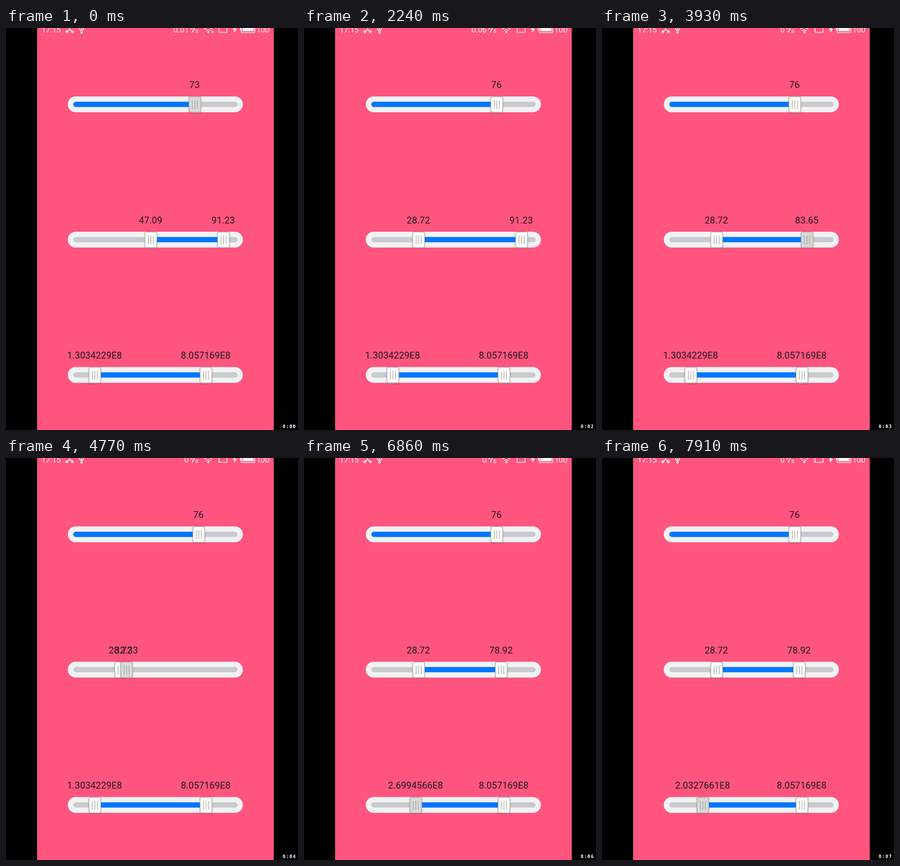
An HTML page with a canvas for the animation above (8000 ms loop, 638 by 878 pixels).

```html
<!DOCTYPE html>
<html>
<head>
<meta charset="utf-8">
<title>Range sliders</title>
<style>
  html, body { margin: 0; width: 100%; height: 100%; overflow: hidden; background: #000; }
  canvas { display: block; }
</style>
</head>
<body>
<canvas id="stage" width="638" height="878"></canvas>
<script>
const g = document.getElementById('stage').getContext('2d');
const LOOP = 8000;
const STEP = 75; // the screen refreshes about this often during a drag
const WHITE = '#fff4f6';

// A thumb rests at its first value and is held down from its first to its last [time, value] point.
const thumb = (rest, ...points) => ({ rest, points });

const sliders = [
  {
    label: v => String(Math.floor(v)),
    thumbs: [thumb(73.8, [0, 73.8], [60, 73.8], [140, 76.2])]
  },
  {
    label: v => v ? String(+v.toFixed(2)) : '0.0',
    thumbs: [
      thumb(47.09, [520, 51.7], [700, 51.7], [970, 27.35], [1370, 0], [1730, 0], [2240, 28.72]),
      thumb(91.23, [3250, 92.8], [3400, 92.8], [3930, 83.65], [4170, 62], [4470, 28.72],
        [4700, 28.72], [4770, 32.33], [5570, 78.92])
    ]
  },
  {
    label: v => (v * 1e7).toExponential(7).replace(/0*e\+/, 'E'),
    thumbs: [
      thumb(13.034229, [6680, 13.034229], [6860, 26.994566], [7080, 44], [7470, 20],
        [7690, 6.1382714], [7910, 20.327661], [LOOP, 20.327661]),
      thumb(80.57169)
    ]
  }
];

// Value and pressed state of a thumb, moving in whole steps between its points.
function pose({ rest, points }, t) {
  const n = points.filter(p => p[0] <= t).length;
  if (n === 0) return { value: rest, down: false };
  const [a, u] = points[n - 1];
  if (n === points.length) return { value: u, down: false };
  const [b, v] = points[n];
  const steps = Math.max(1, Math.round((b - a) / STEP));
  const p = Math.floor((t - a) / (b - a) * steps) / steps;
  return { value: u + (v - u) * p, down: true };
}

function box(x, y, w, h, r, fill) {
  g.fillStyle = fill;
  g.beginPath();
  g.roundRect(x, y, w, h, r);
  g.fill();
}

function text(s, x, y, font, align = 'left', color = WHITE) {
  g.font = font;
  g.textAlign = align;
  g.fillStyle = color;
  g.fillText(s, x, y);
}

function dot(x, y, r) {
  g.beginPath();
  g.arc(x, y, r, 0, 7);
  g.fill();
}

function drawThumb(x, y, down) {
  g.save();
  g.shadowColor = 'rgba(0,0,0,.3)';
  g.shadowBlur = 3;
  g.shadowOffsetY = 0.5;
  box(x - 13.5, y - 17, 27, 35.5, 4, down ? '#b2b2b2' : '#bcbcbc');
  g.restore();
  box(x - 12, y - 15.5, 24, 32, 3, down ? '#d9d9d9' : '#fcfcfc');
  for (const dx of [-5.5, 0, 5.5]) {
    box(x + dx - 0.9, y - 8.5, 1.8, 19, 0, down ? '#b0b0b0' : '#bdbdbd');
  }
}

function drawSlider({ label, thumbs }, y, t) {
  const poses = thumbs.map(th => pose(th, t));
  const xs = poses.map(p => 147 + 3.595 * p.value);
  const range = xs.length > 1;
  const left = range ? xs[0] : 147;
  box(135, y - 17, 382.5, 34.5, 17.2, '#f1f2f4');
  box(147, y - 5.4, 359, 11.4, 5.7, '#c9cacb');
  box(left, y - 5.4, xs[xs.length - 1] - left, 11.4, range ? 0 : [5.7, 0, 0, 5.7], '#0077ff');
  poses.forEach(({ value, down }, i) => {
    drawThumb(xs[i] + 0.3, y, down);
    text(label(value), xs[i] - 0.4, y - 35.5, '20.4px Roboto, sans-serif', 'center', '#241a1d');
  });
}

// Linked nodes, USB, speed slash, card and battery outlines
const outlines = new Path2D(`M139-3V3L133 8M139 3L145 8
  M165-3V10M160.5 0V3L165 6.5 169.5 3V0
  M413-2L407 9.5
  M465.5-2V9.5H483V-2
  M514-2V8Q514 10 516 10H541.5Q543.5 10 543.5 8V-2`);
const bolt = new Path2D('M501-3L495.5 4H499L498 10.5 505 2H501Z');
const download = new Path2D('M450.3 5H451.7V8H453.7L451 11.5 448.3 8H450.3Z');

function drawStatus(t) {
  const font = '17px Roboto, sans-serif';
  const idle = t >= 867;
  text('17:15', 77.5, 9.5, font);
  text(!idle ? '0.01' : t < 3680 ? '0.06' : '0', 399, 9.5, font, 'right');
  text('K', 402.5, 3.5, '10px Roboto, sans-serif');
  text('s', 413.5, 10.5, '14px Roboto, sans-serif');
  text('100', 547, 9.5, font);

  g.strokeStyle = WHITE;
  g.lineWidth = 1.7;
  g.stroke(outlines);
  for (const r of [7, 12]) {
    g.beginPath();
    g.arc(442, 11, r, -Math.PI * 0.76, -Math.PI * 0.24);
    g.stroke();
  }
  g.fill(bolt);
  if (!idle) g.fill(download);
  dot(442, 9, 2.2);
  dot(133, 8.3, 2.8);
  dot(145, 8.3, 2.8);
  dot(165, 10, 2.4);
  box(511, -1, 2.5, 6, 1, WHITE);
  box(516.5, -4, 24.5, 11, 1, WHITE);
}

function drawClock(t) {
  g.letterSpacing = '1.4px';
  text('0:0' + Math.floor((t + 50) / 1030), 604.5, 873.5,
    'bold 10px "DejaVu Sans Mono", monospace', 'left', '#fff');
  g.letterSpacing = '0px';
}

function frame(now) {
  const t = now % LOOP;
  g.fillStyle = '#000';
  g.fillRect(0, 0, 638, 878);
  g.fillStyle = '#ff557f';
  g.fillRect(68, 0, 517, 878);
  drawStatus(t);
  sliders.forEach((s, i) => drawSlider(s, 166.5 + 295.5 * i, t));
  drawClock(t);
  requestAnimationFrame(frame);
}
requestAnimationFrame(frame);
</script>
</body>
</html>
```
